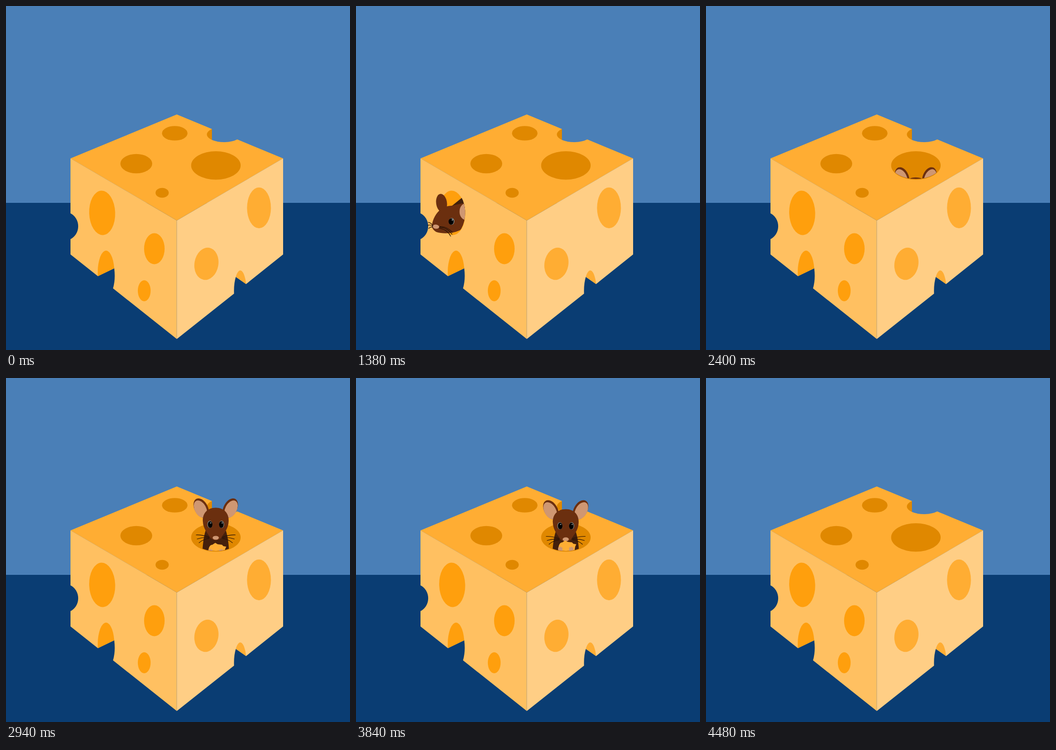
Recreate the animation shown at these times as an HTML page. Size 720x720 px, loop 4800 ms.

```html
<!DOCTYPE html>
<html lang="en">
<head>
<meta charset="utf-8">
<title>Mouse in the cheese</title>
<style>
  html, body { margin: 0; height: 100%; overflow: hidden; background: #0a3d73; }
  svg { display: block; width: 100vw; height: 100vh; }
  .whisker { fill: none; stroke: #241005; stroke-width: 1.1; stroke-linecap: round; }
</style>
</head>
<body>
<svg viewBox="0 0 720 720">
  <defs>
    <clipPath id="sideClip"><path d="M201 386.5A27.5 46.5 0 0 1 201 479.5V600H0V300H201Z"/></clipPath>
    <clipPath id="topClip"><path d="M387.5 333.7A51.8 29.7 0 0 0 491 333.7H600V100H280V333.7Z"/></clipPath>
  </defs>

  <rect width="720" height="412" fill="#4a7fb7"/>
  <rect y="412" width="720" height="308" fill="#0a3d73"/>

  <!-- Cheese faces -->
  <path fill="#ffad33" d="M357.5 227L431 257.4V280.3A36 16 0 0 0 484 279.3L580 319L357.5 449L135 319Z"/>
  <path fill="#ffc061" d="M135 319L357.5 449V697L224 591A17.3 45 0 0 0 226.5 549L192.3 565.5L135 520V488A27 29.5 0 0 0 135 434Z"/>
  <path fill="#ffce85" d="M357.5 449L580 319V520L502.5 582L481 567A12.8 42 0 0 0 477.3 602L357.5 697Z"/>

  <!-- Holes -->
  <g fill="#e08800">
    <path d="M431 257.6A36 16 0 0 0 431 280.3Z"/>
    <ellipse cx="353.2" cy="266.4" rx="26.7" ry="15.2"/>
    <ellipse cx="272.7" cy="330" rx="33.3" ry="20.2"/>
    <ellipse cx="326.8" cy="391" rx="13.8" ry="10.2"/>
    <ellipse cx="439.3" cy="333.7" rx="51.8" ry="29.7"/>
  </g>
  <g fill="#ff9f0d">
    <ellipse cx="201.3" cy="433" rx="27.2" ry="46.5" transform="rotate(-2 201 433)"/>
    <ellipse cx="310.5" cy="508" rx="21.5" ry="32.5"/>
    <ellipse cx="289.3" cy="596" rx="13.4" ry="22"/>
    <path d="M192.3 565.5A17.3 45 0 0 1 226.5 549Z"/>
  </g>
  <g fill="#ffad33">
    <ellipse cx="529.5" cy="422.5" rx="25" ry="42.7"/>
    <ellipse cx="419.5" cy="539.6" rx="25" ry="34" transform="rotate(10 419.5 539.6)"/>
    <path d="M481 567A12.8 42 0 0 1 502.5 582Z"/>
  </g>

  <!-- Mouse peeking out of the side -->
  <g clip-path="url(#sideClip)">
    <g id="side">
      <path fill="#40200d" d="M196 422L223 400L250 404V430H200Z"/>
      <ellipse cx="178.8" cy="412.5" rx="11.3" ry="19.3" fill="#6b2f0f" transform="rotate(-8 179 412)"/>
      <path fill="#6b2f0f" d="M158.5 461C160 446 168 432 178 425Q188 418 200 418L222 413L275 420V462Q235 462 220 468C205 476 184 478 168 473Q160 469 158.5 461Z"/>
      <ellipse cx="230" cy="430.5" rx="13.5" ry="17.5" fill="#cf9772"/>
      <ellipse cx="167" cy="462" rx="7" ry="4.3" fill="#cf9772" transform="rotate(8 167 462)"/>
      <ellipse cx="200" cy="450.8" rx="5.6" ry="7" fill="#9aa5a5"/>
      <ellipse cx="199" cy="451.2" rx="5.4" ry="6.6"/>
      <circle cx="201.5" cy="447.8" r="1.2" fill="#c8d0d0"/>
      <path class="whisker" d="M175 462Q190 461 202 474M175 463Q191 464 201 478M174 465Q191 468 198 482M161 460Q156 453 151 453M160 461Q155 457 150 459.500M161 463Q155 462 152 466"/>
    </g>
  </g>

  <!-- Mouse rising from the top -->
  <g clip-path="url(#topClip)">
    <g id="head">
      <g id="ear">
        <ellipse cx="408" cy="273" rx="14" ry="22" fill="#6b2f0f" transform="rotate(-30 408 273)"/>
        <ellipse cx="406.5" cy="275" rx="12" ry="19.5" fill="#cf9772" transform="rotate(-30 406.500 275)"/>
      </g>
      <use href="#ear" transform="matrix(-1 0 0 1 878 0)"/>
      <path fill="#45200c" d="M419 316Q410 338 410 400H468Q468 338 459 316Z"/>
      <path fill="#6b2f0f" d="M439 271.500C457 271.500 467 284 466 300C465.500 316 455 326 450 335Q439 344 428 335C423 326 412.500 316 412 300C411 284 421 271.500 439 271.500Z"/>
      <g id="half">
        <ellipse cx="426.8" cy="306.5" rx="5.3" ry="7.6" fill="#8f9a98"/>
        <ellipse cx="427.300" cy="306.800" rx="4.800" ry="7"/>
        <path class="whisker" d="M425 333Q411 328 398 328.500M425 334.500Q412 333 400 337M425 336Q413 337 404 345"/>
      </g>
      <use href="#half" transform="matrix(-1 0 0 1 878 0)"/>
      <g fill="#c8d0d0"><circle cx="428.500" cy="303.500" r="1.100"/><circle cx="452.500" cy="303.500" r="1.100"/></g>
      <ellipse cx="439" cy="334.500" rx="6.500" ry="4" fill="#cf9772"/>
    </g>
    <g id="snack">
      <path fill="#ffad33" d="M424 358Q426 349 432 349L438 345L443 348L452 349L455 352L461 353Q457 360 458 366L454 385H427Z"/>
      <g fill="#cf9772">
        <path id="paw" d="M423 385V361Q424 357 426 360Q427 355 429 360Q432 357 432 362L433 385Z"/>
        <use href="#paw" transform="matrix(-1 0 0 1 878 0)"/>
      </g>
    </g>
  </g>
</svg>
<script>
const LOOP = 4800;
const el = id => document.getElementById(id);
const smooth = p => (1 - Math.cos(Math.PI * p)) / 2;
const easeOut = p => Math.sin(Math.PI / 2 * p);
const easeIn = p => 1 - Math.cos(Math.PI / 2 * p);

// Each key is [time, value, ease towards it]
function track(t, ...keys) {
  let [t0, v0] = keys[0];
  for (const [t1, v1, ease = smooth] of keys) {
    if (t < t1) return t <= t0 ? v0 : v0 + (v1 - v0) * ease((t - t0) / (t1 - t0));
    [t0, v0] = [t1, v1];
  }
  return v0;
}

function move(id, x, y, turn = 0, cx = 0, cy = 0) {
  el(id).setAttribute("transform", `translate(${x} ${y}) rotate(${turn} ${cx} ${cy})`);
}

function draw(t) {
  // Side mouse: 1 is hidden, 0 is looking out
  const hide = track(t, [220, 1], [620, 0, easeOut], [1360, 0], [1850, 1, easeIn]);
  const lean = track(t, [220, 0], [620, -10, easeOut], [930, 0]);
  move("side", 75 * hide + lean, -37 * hide, 28 * hide, 199, 451);

  // Top mouse
  const rise = track(t, [2180, 118], [2840, -4], [2950, 0], [3990, 0], [4565, 125]);
  const splay = track(t, [2180, -12], [2400, -8], [2700, 25], [2790, 25],
    [2900, -4], [2980, 0], [3990, 0], [4250, -22]);
  const eat = track(t, [2960, 0], [3180, 1], [3900, 1], [3990, 0]);
  const bite = Math.cos(2 * Math.PI * (t - 3840) / 260);
  move("head", 0, rise + eat * (2 + bite));
  move("ear", 0, 0, -splay, 422, 290);
  move("snack", 0, rise - eat * (4 + bite));
}

function frame(now) {
  draw(now % LOOP);
  requestAnimationFrame(frame);
}
draw(0);
requestAnimationFrame(frame);
</script>
</body>
</html>
```
